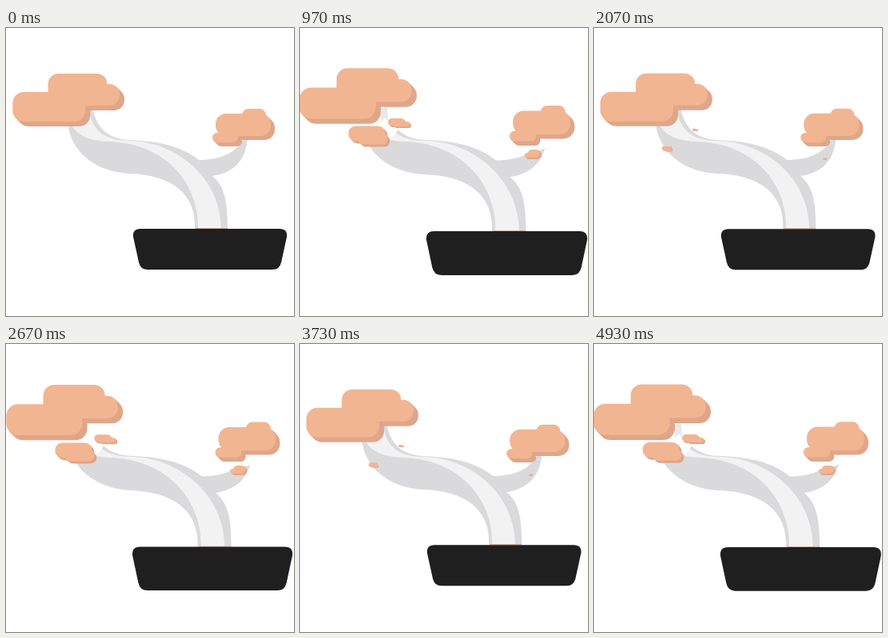
An HTML page with a canvas for the animation above (5000 ms loop, 360 px wide and 360 px high).

```html
<!DOCTYPE html>
<html lang="en">
<head>
<meta charset="utf-8">
<title>Breathing bonsai</title>
<style>
html, body { margin: 0; width: 100%; height: 100%; overflow: hidden; background: #fff; }
canvas { display: block; width: 360px; height: 360px; }
</style>
</head>
<body>
<canvas id="stage" width="360" height="360"></canvas>
<script>
const ctx = document.getElementById('stage').getContext('2d');
const LOOP = 5000, HALF = 965, GROW = 545;
const PEACH = '#f2b592', PEACH_DARK = '#dfa68a', LIGHT = '#f2f2f3', GREY = '#dadadc', BLACK = '#1f1f1f';

const bark = new Path2D('M77 118C80 153 110 180 155 182C207 184 238 207 236 251H277C277 215 273 198 258 185C285 181 300 165 302 138L297 138C288 156 268 165 241 165C215 144 180 141 153 140C127 138 114 126 108 100Z');
const face = new Path2D('M79 116L104 103C108 130 126 141 155 141C210 142 268 184 269 251H240C242 200 205 145 130 142C105 141 88 136 79 116Z');
const pot = new Path2D('M168 251H342Q352 251 351 261L344 293Q342 302 333 302H177Q168 302 166 293L159 261Q158 251 168 251Z');
const stub = new Path2D('M101 118V101L109 97L110 117L106 112Z');

// Each rectangle: x, y, width, height, radius of the lit face
const leftCrown = [[52.5, 57, 74, 40, 13], [8.3, 80, 91, 37, 14], [85, 70, 57, 27, 13]];
const rightCrown = [[295, 101, 30, 25, 8], [262, 107, 69, 28, 13], [258, 131, 32, 12, 6]];
const budLarge = [[-29, -30, 46, 19, 9], [-17, -21, 37, 14, 7]];
const budMid = [[-16, -16, 21, 9, 4.5], [-10, -12, 21, 6, 3]];
const budSmall = [[-5, -13.5, 15, 9, 4.5], [-9, -9.5, 17, 6, 3]];

function draw(path, color) {
  ctx.fillStyle = color;
  ctx.fill(path);
}

// The first `flat` rectangles cast no shade
function foliage(rects, depth, flat = 0) {
  for (let d = depth; d >= 0; d--) {
    ctx.fillStyle = d ? PEACH_DARK : PEACH;
    ctx.beginPath();
    for (const [x, y, w, h, r] of rects.slice(d ? flat : 0)) ctx.roundRect(x + d, y + d, w, h, r);
    ctx.fill();
  }
}

function placed(sx, sy, x, y, paint) {
  ctx.save();
  ctx.transform(sx, 0, 0, sy, x, y);
  paint();
  ctx.restore();
}

function gap(x, y, rx, ry) {
  ctx.fillStyle = '#fff';
  ctx.beginPath();
  ctx.ellipse(x, y, rx, ry, 0, 0, 2 * Math.PI);
  ctx.fill();
}

function render(t) {
  const phase = t % (2 * HALF);
  const rest = Math.min(phase, 2 * HALF - phase);
  const p = (1 - Math.cos(Math.PI * rest / HALF)) / 2;
  const s = Math.min(1, rest / GROW);
  const open = s * s;
  ctx.clearRect(0, 0, 360, 360);

  const k = 1 + 0.03 * p;
  placed(k, k, -3 * p, -4.4 * p, () => {
    draw(bark, GREY);
    draw(face, LIGHT);
    ctx.fillStyle = '#c9a894';
    ctx.fillRect(237, 250, 40, 1);
  });

  // The branches part from the crowns as the buds open
  gap(98, 119, 26 * open, 23 * open);
  gap(298, 144, 11 * open, 9 * open);
  if (p > 0.9) draw(stub, '#e8e8ea');

  placed(1 + 0.047 * p, 1 + 0.078 * p, -8.5 * p, -16.6 * p, () => draw(pot, BLACK));
  placed(1 + 0.05 * p, 1 + 0.055 * p, -9.5 * p, -9.9 * p, () => foliage(leftCrown, 6, 1));
  placed(1 + 0.042 * p, 1 + 0.06 * p, -6.9 * p, -10 * p, () => foliage(rightCrown, 5, 1));

  const late = Math.max(0, p - 0.58) * 2.4;
  if (s > 0) {
    placed(s, s, 92.5 - 3 * late, 155.5 - 3 * late, () => foliage(budLarge, 3));
    placed(s, s, 127 - late, 130 - late, () => foliage(budMid, 2));
    placed(s, s, 288 + 2 * late, 165.5, () => foliage(budSmall, 2));
  }
}

const start = performance.now();
function tick() {
  render((performance.now() - start) % LOOP);
  requestAnimationFrame(tick);
}
tick();
</script>
</body>
</html>
```
